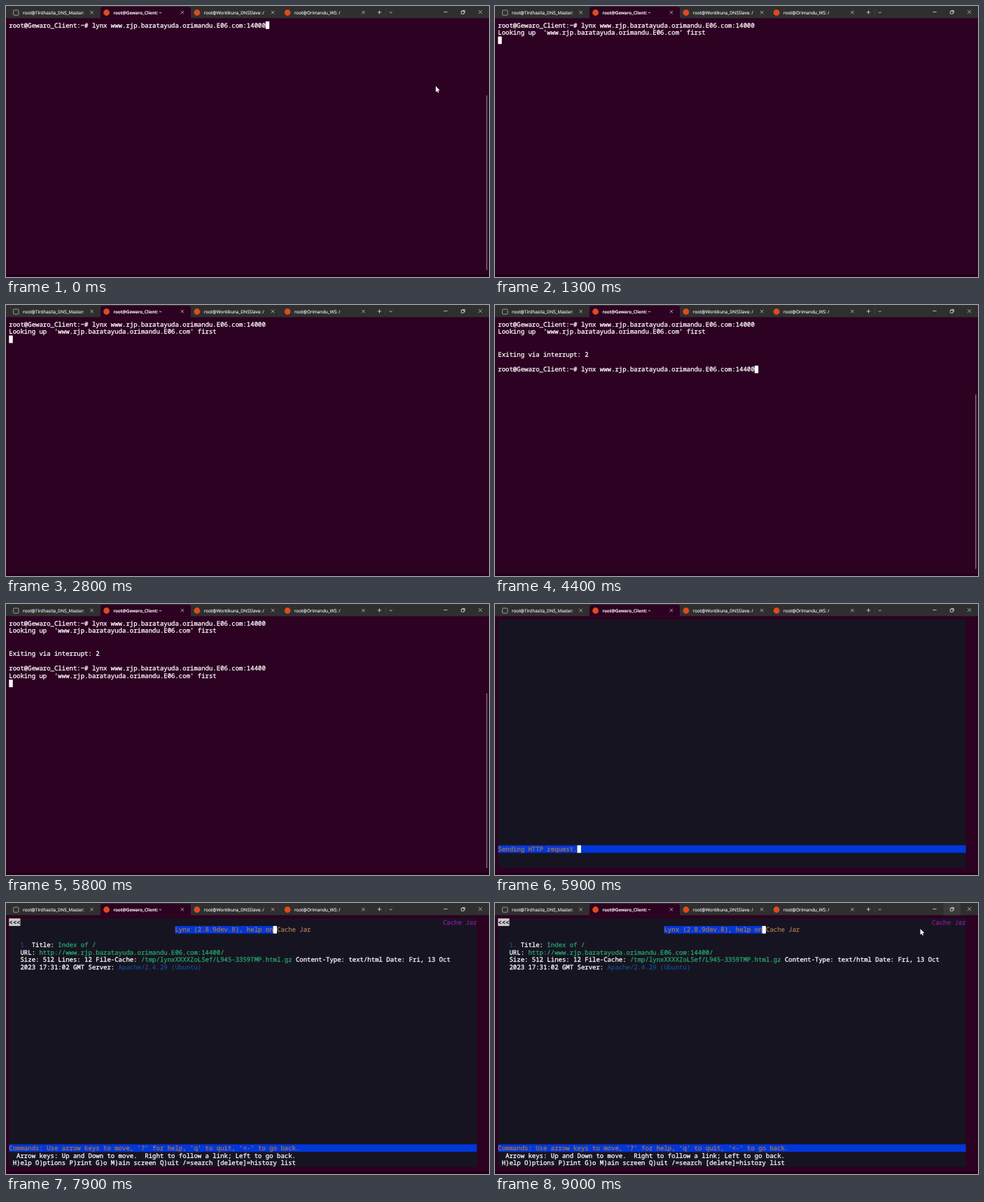
These frames come from a looping animation (690x388 px, 9100 ms). An HTML page with a canvas:

```html
<!DOCTYPE html>
<html lang="en">
<head>
<meta charset="utf-8">
<title>Terminal</title>
<style>
  html, body { margin: 0; width: 100%; height: 100%; overflow: hidden; background: #2c0121; }
  canvas { display: block; }
</style>
</head>
<body>
<canvas id="stage" width="690" height="388"></canvas>
<script>
const ctx = document.getElementById('stage').getContext('2d');
const LOOP = 9100, LEFT = 4.3, TOP = 22.1, CELL_W = 5.39, CELL_H = 10.78, COLS = 124, ROWS = 33;
const C = {
  bg: '#2c0121', bar: '#2f2f2f', black: '#171421', white: '#fafafa', yellow: '#a2734c',
  green: '#26a269', purple: '#881798', blue: '#0037da', navy: '#12488b', grey: '#cccccc'
};
const HOST = 'www.rjp.baratayuda.orimandu';
const PROMPT = 'root@Gewaro_Client:~# ';
const command = port => `lynx ${HOST}.E06.com:${port}`;
const LOOKUP = `Looking up  '${HOST}.E06.com' first`;

ctx.textRendering = 'geometricPrecision';
ctx.lineJoin = 'round';

function rect(x, y, w, h, color) {
  ctx.fillStyle = color;
  ctx.fillRect(x, y, w, h);
}

function lines(color, width, ...paths) {
  ctx.strokeStyle = color;
  ctx.lineWidth = width;
  ctx.beginPath();
  for (const [x, y, ...rest] of paths) {
    ctx.moveTo(x, y);
    for (let i = 0; i < rest.length; i += 2) ctx.lineTo(rest[i], rest[i + 1]);
  }
  ctx.stroke();
}

function cross(x, y, r) {
  lines('#dddddd', 0.7, [x - r, y - r, x + r, y + r], [x - r, y + r, x + r, y - r]);
}

// Fill plus a thin outline gives a weight between regular and bold.
function label(text, x, y, color, weight) {
  ctx.fillStyle = ctx.strokeStyle = color;
  ctx.lineWidth = weight;
  ctx.fillText(text, x, y);
  ctx.strokeText(text, x, y);
}

// Terminal grid

function fillCells(row, col, count, color, rows = 1) {
  rect(LEFT + col * CELL_W, TOP + row * CELL_H, count * CELL_W, rows * CELL_H, color);
}

function put(row, col, text, color = C.white, back) {
  if (back) fillCells(row, col, text.length, back);
  ctx.font = '8.98px "Noto Sans Mono", "DejaVu Sans Mono", monospace';
  [...text].forEach((ch, i) => {
    if (ch !== ' ') label(ch, LEFT + (col + i) * CELL_W, TOP + row * CELL_H + 8.4, color, 0.32);
  });
  return col + text.length;
}

function putRuns(row, col, ...runs) {
  for (const [text, color, back] of runs) col = put(row, col, text, color, back);
}

const cursor = (row, col, ch = ' ') => put(row, col, ch, C.bg, '#ffffff');

function promptLine(row, text, at = text.length, visible = true) {
  put(row, 0, PROMPT + text);
  if (visible) cursor(row, PROMPT.length + at, text[at]);
}

function scrollbar() {
  rect(686.2, 128, 1.2, 250, '#91818d');
}

// Screens

function lookupScreen() {
  put(0, 0, PROMPT + command(14000));
  put(1, 0, LOOKUP);
}

function shellAgain(t) {
  lookupScreen();
  put(4, 0, 'Exiting via interrupt: 2');
  scrollbar();
  if (t >= 5800) {
    put(6, 0, PROMPT + command(14400));
    put(7, 0, LOOKUP);
    cursor(8, 0);
    return;
  }
  const text = t < 3600 ? '' : t < 4000 ? command(14000) : t < 4400 ? 'clear' : command(14400);
  const back = t < 4900 ? 0 : Math.min(3, Math.floor((t - 4800) / 100));
  promptLine(6, text, text.length - back, t < 5300);
}

function browser(status) {
  fillCells(0, 0, COLS, C.black, ROWS);
  put(30, 0, status.padEnd(COLS), C.yellow, C.blue);
}

function page(title) {
  browser("Commands: Use arrow keys to move, '?' for help, 'q' to quit, '<-' to go back.");
  put(31, 2, 'Arrow keys: Up and Down to move.  Right to follow a link; Left to go back.');
  put(32, 1, 'H)elp O)ptions P)rint G)o M)ain screen Q)uit /=search [delete]=history list');
  put(0, COLS - title.length, title, C.purple);
}

function indexPage(port) {
  page('Index of /');
  put(1, 57, 'Index of /', C.yellow, C.blue);
  putRuns(3, 3, ['[ICO] Name ', C.yellow], ['Last modified Size Description', C.green]);
  cursor(3, 8);
  const files = [
    ['[ ]', 'nemi-tolk.webp', '7.4K'],
    ['[IMG]', 'dren.png', '384K'],
    ['[SND]', 'mipo.mp3', '19K'],
    ['[IMG]', 'zel.jpg', '35K']
  ];
  files.forEach(([kind, name, size], i) =>
    putRuns(6 + i, 3, [kind + ' ', C.yellow], [name, C.green], [' 2023-10-14 00:26 ' + size]));
  for (const row of [4, 10]) put(row, 5, '_'.repeat(110), C.yellow);
  put(13, 4, `Apache/2.4.29 (Ubuntu) Server at ${HOST}.e06.com Port ${port}`, C.purple);
}

function cachePage() {
  page('Cache Jar');
  put(0, 0, '<<<', C.black, C.grey);
  putRuns(1, 44, ['Lynx (2.8.9dev.8), help on', C.yellow, C.blue], [' Cache Jar', C.yellow]);
  cursor(1, 70);
  putRuns(3, 3, ['1. ', C.navy], ['Title: '], ['Index of /', C.green]);
  putRuns(4, 3, ['URL: '], [`http://${HOST}.E06.com:14400/`, C.green]);
  putRuns(5, 3, ['Size: 512 Lines: 12 File-Cache: '],
    ['/tmp/lynxXXXXZoLSef/L945-3359TMP.html.gz', C.green],
    [' Content-Type: text/html Date: Fri, 13 Oct']);
  putRuns(6, 3, ['2023 17:31:02 GMT Server: '], ['Apache/2.4.29 (Ubuntu)', C.navy]);
}

// Window frame and pointer

function titleBar(hover) {
  rect(0, 0, 690, 17.4, C.bar);
  if (hover) rect(640.5, 0, 24.7, 17.4, '#3b3b3b');
  ctx.fillStyle = C.bg;
  ctx.beginPath();
  ctx.roundRect(135, 1.3, 129, 16.3, [3, 3, 0, 0]);
  ctx.fill();

  const tabs = ['Tirdhasita_DNS_Master:', 'Gewaro_Client: ~', 'Wontikuna_DNSSlave: /', 'Orimandu_WS: /'];
  tabs.forEach((name, i) => {
    const x = 14.3 + i * 129.3, active = i === 1;
    ctx.beginPath();
    if (i) {
      ctx.fillStyle = '#dd4a20';
      ctx.arc(x, 9.5, 4.4, 0, 7);
      ctx.fill();
    } else {
      ctx.strokeStyle = '#b5b5b5';
      ctx.lineWidth = 0.8;
      ctx.roundRect(x - 3.7, 6, 7.4, 7.2, 1.2);
      ctx.stroke();
    }
    ctx.font = `${active ? 600 : 400} 6.3px "Open Sans", "Noto Sans", sans-serif`;
    label('root@' + name, x + 9.8, 12.1, active ? '#ffffff' : '#eeeeee', 0.15);
    cross(x + 108.3, 9.2, 2.2);
  });

  lines('#dddddd', 0.8, [530.8, 9, 536.2, 9], [533.5, 6.3, 533.5, 11.7],
    [547.7, 8.2, 549.7, 10.2, 551.7, 8.2], [625.3, 8.6, 630.7, 8.6],
    [650.4, 7.5, 654.2, 7.5, 654.2, 11.3, 650.4, 11.3, 650.4, 7.1],
    [651.6, 6.4, 655.4, 6.4, 655.4, 10.2]);
  lines('#484848', 0.7, [542.5, 4, 542.5, 14]);
  cross(677.6, 8.6, 2.5);
}

function pointer(x, y) {
  const shape = [[0, 0], [0, 8.4], [1.9, 6.7], [3.2, 9.5], [4.5, 8.9], [3.3, 6.2], [5.8, 6]];
  ctx.beginPath();
  for (const [dx, dy] of shape) ctx.lineTo(x + dx, y + dy);
  ctx.closePath();
  ctx.strokeStyle = '#111111';
  ctx.lineWidth = 0.8;
  ctx.stroke();
  ctx.fillStyle = '#ffffff';
  ctx.fill();
}

function draw(t) {
  rect(0, 0, 690, 388, C.bg);
  rect(0, 384.5, 690, 3.5, '#23001a');
  titleBar(t >= 8500);

  if (t < 1300) {
    promptLine(0, command(14000));
    scrollbar();
    pointer(613.9, 114.8);
  } else if (t < 1400 || (t >= 2800 && t < 2900)) {
    lookupScreen();
    cursor(2, 0);
  } else if (t < 2800) {
    indexPage(14000);
  } else if (t < 5900) {
    shellAgain(t);
  } else if (t < 6000) {
    browser('Sending HTTP request.');
    cursor(30, 21);
  } else if (t < 7900) {
    indexPage(14400);
  } else {
    cachePage();
    if (t >= 8500) {
      const p = (t - 8500) / 500;
      pointer(651 - 43.4 * p, 8 + 29 * p);
    }
  }
}

function tick() {
  // The screen refreshes ten times a second.
  draw(Math.floor(performance.now() % LOOP / 100) * 100);
  requestAnimationFrame(tick);
}
tick();
</script>
</body>
</html>
```
